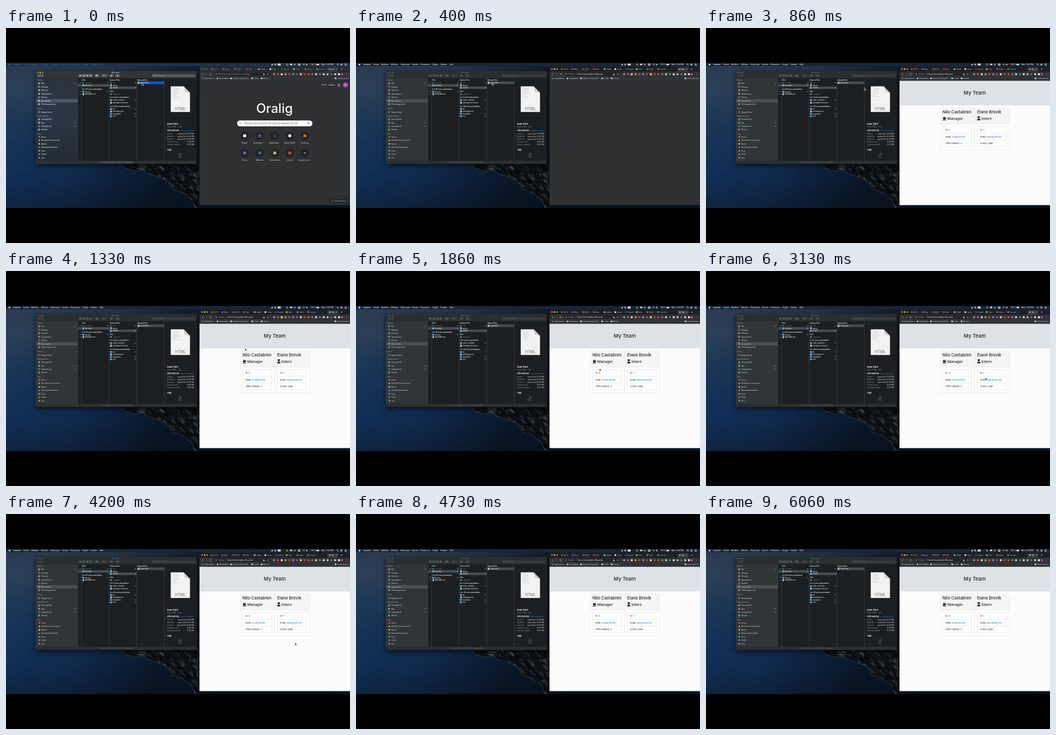
An HTML page with a canvas for the animation above (6130 ms loop, 640 by 400 pixels).

```html
<!DOCTYPE html>
<html lang="fr">
<head>
<meta charset="utf-8">
<style>
html, body { margin: 0; width: 100%; height: 100%; overflow: hidden; background: #000; }
canvas { display: block; width: 640px; height: 400px; }
</style>
</head>
<body>
<canvas id="stage" width="640" height="400"></canvas>
<script>
const LOOP = 6130, FOCUS = 190, LOADED = 600;
const stage = document.getElementById('stage');
let g = stage.getContext('2d');

function rect(x, y, w, h, color) {
  g.fillStyle = color;
  g.fillRect(x, y, w, h);
}
function pill(x, y, w, h, r, color) {
  g.fillStyle = color;
  g.beginPath();
  g.roundRect(x, y, w, h, r);
  g.fill();
}
function dot(x, y, r, color) {
  g.fillStyle = color;
  g.beginPath();
  g.arc(x, y, r, 0, 7);
  g.fill();
}
function ring(x, y, r, color, width = 0.6, from = 0, to = 7) {
  g.strokeStyle = color;
  g.lineWidth = width;
  g.beginPath();
  g.arc(x, y, r, from, to);
  g.stroke();
}
function path(points, color) {
  g.beginPath();
  for (let i = 0; i < points.length; i += 2) g.lineTo(points[i], points[i + 1]);
  g.closePath();
  g.fillStyle = color;
  g.fill();
}
function line(points, color, width = 0.6) {
  g.beginPath();
  for (let i = 0; i < points.length; i += 2) g.lineTo(points[i], points[i + 1]);
  g.strokeStyle = color;
  g.lineWidth = width;
  g.stroke();
}
function text(s, x, y, size, color, weight = 400, align = 'left') {
  g.font = `${weight} ${size}px Inter, "Open Sans", sans-serif`;
  g.textAlign = align;
  g.fillStyle = color;
  g.fillText(s, x, y);
}
function clipped(x, y, w, h, draw) {
  g.save();
  g.beginPath();
  g.rect(x, y, w, h);
  g.clip();
  draw();
  g.restore();
}
function fade(x0, y0, x1, y1, ...colors) {
  const f = g.createLinearGradient(x0, y0, x1, y1);
  colors.forEach((c, i) => f.addColorStop(i / (colors.length - 1), c));
  return f;
}
function seeded(seed) {
  return () => (seed = (seed * 16807) % 2147483647) / 2147483647;
}

// Night sea with a rocky coast, painted once
function paintWallpaper() {
  rect(0, 65, 640, 270, fade(0, 65, 0, 335, '#2b3b50', '#2a3f58', '#1c3857', '#15335a', '#12305a', '#0f2745'));
  const rnd = seeded(41);
  for (let i = 0; i < 700; i++) {
    const y = 150 + rnd() * 185, x = rnd() * 360;
    rect(x, y, 2 + rnd() * 9, 0.8, rnd() > 0.5 ? 'rgba(90,125,165,.09)' : 'rgba(2,8,20,.16)');
  }
  rect(0, 65, 640, 270, fade(0, 170, 300, 290, 'rgba(6,10,16,0)', 'rgba(6,10,16,.2)', 'rgba(6,10,16,.72)'));

  const shore = [216, 252, 222, 261, 240, 266, 256, 264, 262, 270, 280, 276, 296, 282,
    305, 291, 309, 300, 330, 307, 345, 319, 352, 335];
  g.save();
  path([...shore, 360, 335, 360, 245], '#0c1116');
  g.clip();
  for (let i = 0; i < 420; i++) {
    const x = 214 + rnd() * 146, y = 250 + rnd() * 85, s = 1.5 + rnd() * 6;
    path([x, y, x + s * 0.8, y + s * 0.6, x + s, y + s * 1.5, x - s * 0.3, y + s * 0.5],
      ['rgba(105,108,108,.32)', 'rgba(3,6,10,.6)', 'rgba(58,66,72,.4)', 'rgba(4,8,12,.5)'][i % 4]);
  }
  g.restore();
  line(shore, 'rgba(120,145,165,.25)', 1.1);
}
const wallpaper = document.createElement('canvas');
wallpaper.width = 640;
wallpaper.height = 400;
const screen = g;
g = wallpaper.getContext('2d');
paintWallpaper();
g = screen;

function menuBar(front) {
  rect(0, 65, 640, 6, front ? '#17263a' : '#1a3452');
  const ink = front ? '#eef1f4' : '#416a96', white = '#e6e9ed';
  dot(6.5, 68, 1.6, ink);
  const items = [['Lumeno', 13.5], ['Fichier', 32], ['Modifier', 47], ['Afficher', 65],
    ['Historique', 83], ['Favoris', 104], ['Personnes', 120], ['Onglet', 142],
    ['Fenêtre', 157], ['Aide', 174]];
  items.forEach(([s, x], i) => text(s, x, 69.3, 3.4, ink, i ? 500 : 700));
  path([493, 68.5, 497, 66.5, 495.5, 70], white);
  rect(499.5, 66.5, 3, 3, '#aab2bb');
  rect(505.5, 66.3, 5.5, 3.4, white);
  ring(523, 68, 1.5, white);
  rect(528.5, 66.5, 4, 2.6, white);
  line([537, 66, 538.5, 67.2, 536, 69, 536, 67, 538.5, 68.8, 537, 70], white, 0.5);
  pill(543.5, 66, 4, 4, 0.7, white);
  text('A', 545.5, 69.3, 3.3, '#172230', 700, 'center');
  for (let r = 1; r < 4; r++) ring(554, 69.7, r, white, 0.5, 3.9, 5.5);
  path([558, 67.4, 559.2, 67.4, 560.6, 66.2, 560.6, 69.8, 559.2, 68.7, 558, 68.7], white);
  text('110 %', 567, 69.3, 3.4, white, 500);
  pill(577.5, 66.8, 5, 2.5, 0.5, white);
  text('Mar. 11:25 PM', 587, 69.3, 3.4, white, 500);
  ring(617, 67.6, 1.3, white);
  line([618, 68.6, 619, 69.8], white);
  dot(624, 68, 1.8, '#9dbbe0');
  for (let i = 0; i < 3; i++) rect(630, 66.5 + i * 1.3, 4, 0.6, white);
}

const folder = '#57b4e6';
function fileIcon(x, y, kind) {
  if (kind === 'd') {
    rect(x, y - 1.5, 1.7, 1, folder);
    rect(x, y - 1.1, 3.6, 2.7, folder);
  } else {
    rect(x + 0.5, y - 1.8, 2.7, 3.6, '#dfe3e6');
    rect(x + 1, y - 0.6, 1.6, 1.4, '#93a1ab');
  }
}
// Rows: [label, y, kind]; kind h = heading, d = folder, f = file, x = dimmed
function column(x, rows) {
  clipped(x, 93, 50, 154, () => {
    for (const [s, y, kind] of rows) {
      if (kind === 'h') {
        text(s, x + 1, y + 1.2, 3.2, '#e4e6e8', 600);
        continue;
      }
      const dim = kind.includes('x');
      g.globalAlpha = dim ? 0.4 : 1;
      fileIcon(x + 1, y, kind[0]);
      text(s, x + 6, y + 1.2, 3.2, '#e6e8ea', 500);
      g.globalAlpha = 1;
      if (kind[0] === 'd') path([x + 47.3, y - 1, x + 49, y, x + 47.3, y + 1], '#b9bec2');
    }
  });
}

function fileWindow(active) {
  g.save();
  g.shadowColor = 'rgba(0,0,0,.6)';
  g.shadowBlur = 9;
  g.shadowOffsetY = 3;
  pill(55, 80, 300, 173, 2, '#1b1f22');
  g.restore();
  pill(55, 80, 300, 13.5, [2, 2, 0, 0], active ? '#323536' : '#292e2f');
  const side = active ? fade(0, 93, 0, 247, '#2b343d', '#2a3744', '#222c36') : '#303637';
  rect(55, 93.5, 78.5, 153.5, side);
  rect(55, 247, 300, 6, active ? '#2d3032' : '#292e2f');
  const tone = active ? '#c4c7ca' : '#687071';
  (active ? ['#f25c54', '#f4bd43', '#42c64c'] : ['#555b5c', '#555b5c', '#555b5c'])
    .forEach((c, i) => dot(59 + i * 4.6, 83, 1.4, c));
  rect(196.5, 81.3, 3, 2.5, active ? folder : '#3b6275');
  text('output', 201, 84, 3.3, tone, 500);
  const button = active ? '#56595b' : '#353b3c';
  for (const [x, w] of [[58, 12], [135, 26], [165, 9], [178, 11], [192, 8], [203, 9], [272, 80]]) {
    pill(x, 86, w, 5.2, 1, button);
  }
  line([62, 87.2, 60.8, 88.6, 62, 90], tone);
  line([66.5, 87.2, 67.7, 88.6, 66.5, 90], tone);
  for (let i = 0; i < 4; i++) {
    rect(136.7 + i * 6.5, 87.1, 1.2, 3, tone);
    rect(138.6 + i * 6.5, 87.1, 1.2, 3, tone);
  }
  rect(167, 87.3, 3.4, 2.5, tone);
  ring(182, 88.6, 1.2, tone);
  path([194.5, 88.5, 196, 87, 198, 88.5, 196, 90.1], tone);
  dot(207.5, 88.6, 1.3, tone);
  ring(275, 88.3, 1, tone, 0.5);
  text('Rechercher', 278, 89.8, 3.2, active ? '#a3a7aa' : '#5f6769');

  const heads = [['Favoris', 97], ['Cloud', 150], ['Emplacements', 163.5], ['Tags', 196.3]];
  for (const [s, y] of heads) text(s, 58, y + 1.2, 3, '#8a9093', 600);
  rect(56, 132.3, 77, 6.3, active ? '#4c5968' : '#4a5051');
  const places = [['Bac', 103], ['Partage', 109.4], ['Récents', 115.8], ['Applications', 122.3],
    ['Bureau', 128.8], ['Documents', 135.4], ['Téléchargements', 141.8], ['Nuage Stock', 156.4],
    ['Principal HD', 170], ['Bac', 176.3], ['Oralig Stock', 182.7], ['Réseau', 189]];
  const label = active ? '#e4e6e8' : '#bcc2c3';
  places.forEach(([s, y], i) => {
    if (i % 3 === 1) ring(61.6, y, 1.5, label, 0.6);
    else {
      rect(60, y - 1.4, 3.2, 2.8, label);
      rect(60.7, y - 0.5, 1.8, 1.2, side);
    }
    text(s, 65.7, y + 1.2, 3.25, label, 500);
  });
  for (const y of [103, 176.3, 182.7]) path([127.3, y + 0.8, 129.7, y + 0.8, 128.5, y - 1], '#92999b');
  const tags = [['Perso', '#f25f58'], ['Borvanel Construction', '#f39b38'], ['Norbe', '#edcc45'],
    ['Borvanel Immobilier', '#3994e6'], ['Tous', '#55c65b'], ['Violet', '#b66ad8'], ['Gris', '#999da0']];
  tags.forEach(([s, c], i) => {
    const y = 202.6 + i * 6.45;
    dot(62, y, 1.5, c);
    text(s, 65.7, y + 1.2, 3.25, label, 500);
  });

  for (const x of [133.5, 140.5, 191.5, 243, 294]) rect(x, 93.5, 0.7, 153.5, '#41474a');
  for (const y of [102, 107, 118, 123]) path([137.5, y - 1, 139.2, y, 137.5, y + 1], '#a9aeb1');
  rect(134.2, 104.4, 6.3, 4.8, '#454b4f');
  rect(141.2, 104.4, 50.3, 4.8, '#454b4f');
  rect(192.2, 108.8, 50.8, 4.8, '#454b4f');
  rect(243.7, 99.4, 50.3, 5, active ? '#0b57d8' : '#464b4d');
  column(141, [['Hier', 96.5, 'h'], ['.vscode', 102, 'dx'], ['Develop', 106.7, 'd'],
    ['Les 30 jours précédents', 113.4, 'h'], ['Assets', 118.3, 'd'], ['README.md', 123, 'f']]);
  column(192.5, [["Aujourd'hui", 96.5, 'h'], ['.git', 102, 'dx'], ['app.js', 106.5, 'f'],
    ['output', 111.2, 'd'], ['Hier', 118, 'h'], ['.gitignore', 122.8, 'fx'],
    ['Les 7 jours précédents', 129, 'h'], ['node_modules', 134, 'd'], ['package-lock.json', 139, 'f'],
    ['Les 30 jours précédents', 145.5, 'h'], ['lib', 150.5, 'd'], ['package.json', 155.2, 'f'],
    ['templates', 159.7, 'd'], ['test', 164.2, 'd']]);
  column(244, [["Aujourd'hui", 96.5, 'h'], ['team.html', 102, 'f']]);

  path([306.5, 108.5, 330.5, 108.5, 342.3, 120.5, 342.3, 156.3, 306.5, 156.3], '#f2f2f2');
  path([330.5, 108.5, 342.3, 120.5, 333, 118.5], '#c9cbcc');
  for (let i = 0; i < 11; i++) rect(309 + (i % 4), 110.5 + i * 1.7, 5 + (i * 7) % 9, 0.5, '#c4c4c4');
  text('HTML', 324.3, 153, 7.1, '#707274', 400, 'center');
  text('team.html', 299.5, 179.6, 4.2, '#f2f3f4', 600);
  text('Texte HTML - 3 Ko', 299.5, 185, 3.1, '#8f9598');
  text('Informations', 299.5, 191.6, 3.7, '#f2f3f4', 600);
  text('Voir moins de détails', 349, 191.5, 2.5, '#2e86e8', 400, 'right');
  const facts = [['Créé le', '10:19 PM'], ['Modifié le', '11:02 PM'], ['Ouvert le', '10:28 PM'],
    ['Contenu créé', '10:19 PM'], ['Contenu modifié', '11:03 PM']];
  facts.forEach(([s, time], i) => {
    const y = 198.2 + i * 5;
    text(s, 299.5, y, 3.1, '#999fa2');
    text((i < 3 ? "aujourd'hui " : '') + time, 349.5, y, 3.1, '#e0e3e5', 400, 'right');
  });
  text('Tags', 299.5, 228.3, 3.7, '#f2f3f4', 600);
  ring(324.3, 235.2, 2, '#8f9598', 0.5);
  for (let i = -1; i < 2; i++) dot(324.3 + i, 235.2, 0.35, '#8f9598');
  text('Plus…', 324.3, 241, 3, '#8f9598', 400, 'center');
  text('1 sur 1 sélectionné(s), 150,43 Go disponibles', 205, 251.2, 3, active ? '#a9adb0' : '#70787a', 400, 'center');
}

const hues = ['#d9433f', '#8353d6', '#5865a8', '#cf3c39', '#a9adb1', '#dfe3e6', '#3b4b55',
  '#e0aa43', '#e65345', '#7b8790', '#58a3cf'];
function tabStrip(front) {
  rect(360, 71, 280, 10.5, front ? '#1e2023' : '#292b2e');
  (front ? ['#f25c54', '#f4bd43', '#42c64c'] : ['#5b5e61', '#5b5e61', '#5b5e61'])
    .forEach((c, i) => dot(364.5 + i * 4.8, 76.2, 1.5, c));
  const names = ['ACTU', 'Blog', 'BUD f', 'Dise', 'isNaN', 'Home', 'Nouvel', 'Note', 'Vidéo', 'Tutoriel'];
  const step = front ? 19.9 : 21.8, ink = front ? '#b8bcc0' : '#92969a';
  names.forEach((s, i) => {
    const x = 381.5 + i * step;
    pill(x, 75, 3, 3, 0.7, hues[i]);
    clipped(x + 4.5, 72, 13, 9, () => text(s, x + 4.5, 77.8, 3.2, ink));
    rect(x + step - 2, 74.5, 0.4, 4, '#4b4f53');
  });
  if (front) {
    pill(598, 73, 20.5, 9, [2, 2, 0, 0], '#36383b');
    dot(602.5, 76.6, 1.4, '#b9bec2');
    text('My…', 606, 77.8, 3.2, '#f1f3f4');
  } else {
    pill(597, 73, 21, 9, [2, 2, 0, 0], '#36383b');
    text('Nouvel', 600, 77.8, 3.2, '#d5d8da');
  }
  line([613.8, 75.5, 616, 77.7], ink, 0.5);
  line([616, 75.5, 613.8, 77.7], ink, 0.5);
  line([623, 76.5, 626, 76.5], ink);
  line([624.5, 75, 624.5, 78], ink);
}
function toolbar(front, loading) {
  rect(360, 81.3, 280, 17.2, '#303336');
  const ink = '#c8cccf';
  line([366.7, 84.2, 365, 86, 366.7, 87.8], ink);
  line([372.5, 84.2, 374.2, 86, 372.5, 87.8], '#767a7e');
  if (loading) {
    line([379.5, 84.5, 382.5, 87.5], ink);
    line([382.5, 84.5, 379.5, 87.5], ink);
  } else ring(381, 86, 1.6, ink, 0.6, 0.3, 5.4);
  pill(387, 82.5, 104, 6.8, 3.4, '#222427');
  ring(391, 86, 1.2, ink, 0.5);
  if (front) {
    text('Fichier', 395, 87.3, 3.4, '#a6abb0');
    rect(408, 84.3, 0.4, 3.4, '#74797e');
    text('/Users/nilocastabren/Docume…', 411, 87.3, 3.4, '#f1f3f4');
  } else text('Effectuez une recherche sur Oralig…', 395, 87.3, 3.5, '#a6abb0');
  path([478, 87.5, 479.8, 84.3, 481.6, 87.5], ink);
  ring(487, 86, 1.3, ink, 0.5);
  const marks = ['#9ea5aa', '#d9433f', '#d8dde0', '#e6a33c', '#ce4038', '#5b92cf', '#c9494b', '#e0d2b6',
    '#c33b3a', '#e15239', '#6c7479', '#c9ced1', '#5c8f6c', '#d7dade', '#b5babe', '#72777b', '#c9ced1', '#f1f3f4'];
  marks.forEach((c, i) => pill(497 + i * 7.1, 84.2, 3.6, 3.6, i % 3 ? 0.7 : 1.8, c));
  dot(625, 86, 1.9, '#ae57c0');
  for (let i = 0; i < 3; i++) dot(633.5, 84.6 + i * 1.4, 0.4, ink);

  for (let i = 0; i < 9; i++) dot(364 + (i % 3) * 1.2, 92.6 + (i / 3 | 0) * 1.2, 0.5, hues[i]);
  text('Applications', 369, 95, 3.2, ink);
  dot(393.5, 93.8, 1.5, ink);
  text('Bookmarks', 397, 95, 3.2, ink);
  const links = [['Importés depuis N…', 417], ['Code', 456.5], ['Bourse', 474], ['Autres favoris', 611.5]];
  for (const [s, x] of links) {
    rect(x, 92.2, 1.6, 1, ink);
    rect(x, 92.7, 3.4, 2.3, ink);
    text(s, x + 5, 95, 3.2, ink);
  }
}

function newTabPage() {
  text('Poste', 587, 107.3, 3.5, '#e8eaed');
  text('Images', 600, 107.3, 3.5, '#e8eaed');
  for (let i = 0; i < 9; i++) rect(617.2 + (i % 3) * 1.6, 104.2 + (i / 3 | 0) * 1.6, 1, 1, '#d5d8da');
  dot(631.5, 106, 5, '#a63ab8');
  text('M', 631.5, 107.7, 4.6, '#f2e6f5', 400, 'center');
  text('Oralig', 499.5, 157.5, 24, '#f5f5f5', 500, 'center');
  pill(430, 172, 140, 11, 5.5, '#fff');
  ring(435.7, 177, 1.5, '#777b80');
  line([436.8, 178.1, 438.2, 179.5], '#777b80');
  text('Effectuez une recherche sur Oralig ou saisissez une URL', 443, 179, 3.75, '#55595d');
  pill(562.2, 174.7, 1.8, 3.6, 0.9, '#4c83df');
  ring(563.1, 177.2, 1.8, '#d65446', 0.5, 0, 3.14);
  const sites = [['Kodrel', '#f4f4f4'], ['Bootstrap · T…', '#6b5296'], ['Motifs Spa…', '#28425b'],
    ['Inbox (6,613)', '#e4e5e6'], ['Continuer', '#d9662f'], ['Plouvo', '#8354d5'], ['Metirane', '#1e75ad'],
    ['Oralig Stock', '#e1b83c'], ['Vidorel', '#e53b32'], ['Ajouter un ra…', '']];
  sites.forEach(([s, c], i) => {
    const x = 444 + (i % 5) * 28, y = 200.5 + (i / 5 | 0) * 32;
    dot(x, y, 7.8, '#212427');
    if (i === 0) dot(x, y, 3, c);
    else if (c) rect(x - 2.6, y - 2.6, 5.2, 5.2, c);
    else {
      line([x - 2, y, x + 2, y], '#e8eaed');
      line([x, y - 2, x, y + 2], '#e8eaed');
    }
    text(s, x, y + 14.5, 3.4, '#e8eaed', 400, 'center');
  });
  pill(602, 317.5, 34, 8.5, 4, '#25292e');
  line([606, 323.3, 608.7, 320.6], '#8ab4f8', 0.9);
  text('Personnaliser', 611, 323.2, 3.4, '#8ab4f8');
}

function card(x, name, role, email, extra) {
  rect(x, 148, 65, 78.5, '#dedfe0');
  rect(x + 0.5, 148.5, 64, 77.5, '#fdfdfd');
  rect(x + 0.5, 148.5, 64, 30, '#f5f5f5');
  rect(x, 178.5, 65, 0.5, '#dedfe0');
  text(name, x + 5, 159.3, 7.65, '#222527', 500);
  text(role, x + (role === 'Intern' ? 13 : 14), 171.2, 6.8, '#222527', 500);
  const ink = '#1f2224';
  if (role === 'Manager') {
    pill(x + 6, 166.3, 4.6, 4, [0, 0, 1, 1], ink);
    ring(x + 10.7, 167.8, 1.3, ink, 0.7);
    rect(x + 5, 171, 7, 0.9, ink);
    line([x + 7.4, 164.4, x + 7, 165.7], ink);
    line([x + 9.4, 164.4, x + 9, 165.7], ink);
  } else {
    path([x + 4.8, 165.2, x + 8, 164, x + 11.2, 165.2, x + 8, 166.4], ink);
    dot(x + 8, 166.7, 1.7, ink);
    pill(x + 5, 169, 6, 2.8, [1.5, 1.5, 0, 0], ink);
  }
  g.strokeStyle = '#e0e1e2';
  g.lineWidth = 0.6;
  g.strokeRect(x + 5.2, 183.5, 54.3, 37.5);
  for (const y of [196, 208.5]) line([x + 5, y, x + 59.5, y], '#e0e1e2');
  text('ID: ' + (role === 'Manager' ? 0 : 1), x + 10.6, 191.4, 3.8, ink);
  text('Email: ', x + 10.6, 203.7, 3.8, ink);
  text(email, x + 10.6 + g.measureText('Email: ').width, 203.7, 3.8, '#1682f0');
  text(extra, x + 10.6, 216, 3.8, ink);
}
function teamPage() {
  rect(360, 98.5, 280, 231, '#fcfcfc');
  rect(360, 98.5, 280, 45.5, '#dde2e6');
  text('My Team', 500, 124.4, 9.3, '#212529', 500, 'center');
  card(435, 'Nilo Castabren', 'Manager', 'nilo@mail.test', 'Office number: 5');
  card(499.5, 'Elane Brovik', 'Intern', 'elane@mail.test', 'School: QRM');
}

function browser(t) {
  const front = t >= FOCUS, loaded = t >= LOADED;
  rect(359.3, 71, 0.7, 259, '#0c1116');
  tabStrip(front);
  toolbar(front, front && !loaded);
  if (loaded) teamPage();
  else {
    rect(360, 98.5, 280, 231, '#2e3032');
    if (!front) newTabPage();
  }
}

// Pointer stops: time, x, y
const stops = [[0, 253, 102], [660, 253, 102], [1330, 445, 144], [1500, 446, 146], [2000, 455, 190],
  [2400, 464, 219.5], [2660, 490, 214], [2860, 516, 202], [3130, 520.5, 198.5], [3400, 520.5, 198.5],
  [3660, 538, 240], [4400, 538, 240], [4700, 652, 300]];
function pointer(t) {
  const i = stops.findIndex(s => s[0] > t);
  if (i < 1) return;
  const [t0, x0, y0] = stops[i - 1], [t1, x1, y1] = stops[i];
  let k = (t - t0) / (t1 - t0);
  k = k * k * (3 - 2 * k);
  g.save();
  g.translate(x0 + (x1 - x0) * k, y0 + (y1 - y0) * k);
  path([-0.5, -0.8, -0.5, 4.8, 0.8, 3.8, 1.6, 5.6, 2.8, 5, 2, 3.4, 3.8, 3.3], '#f4f4f4');
  path([0, 0.3, 0, 3.8, 0.9, 3, 1.8, 4.9, 2.2, 4.7, 1.4, 2.9, 2.7, 2.8], '#080808');
  g.restore();
}

function draw(t) {
  rect(0, 0, 640, 400, '#000');
  clipped(0, 65, 640, 270, () => {
    g.drawImage(wallpaper, 0, 0);
    fileWindow(t < FOCUS);
    browser(t);
    menuBar(t >= FOCUS);
    pointer(t);
  });
}

const start = performance.now();
function tick() {
  draw((performance.now() - start) % LOOP);
  requestAnimationFrame(tick);
}
tick();
</script>
</body>
</html>
```
